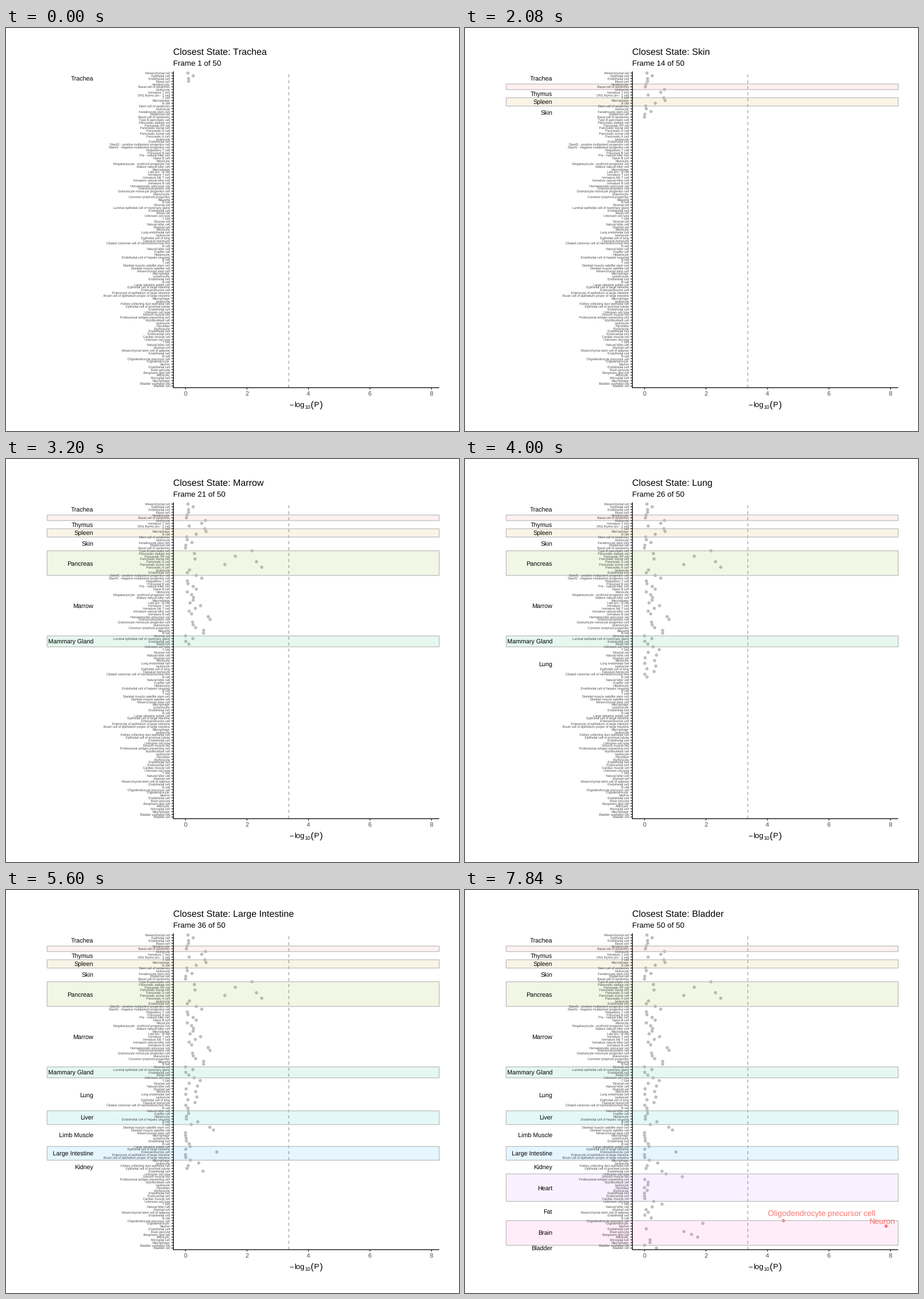
Recreate the animation shown at these times as a matplotlib script. Size 794x706 px, loop 8 s.

```python
import matplotlib.pyplot as plt
from matplotlib.animation import FuncAnimation
from matplotlib.patches import Rectangle

plt.rcParams["font.family"] = "Liberation Sans"
plt.rcParams["text.hinting"] = "none"
plt.rcParams["text.kerning_factor"] = 6

W, H, DPI = 794, 706, 100
PX = 72 / DPI                 # one pixel in points
PT = 88.22 / 72 * PX          # one chart point in figure points
LINE = 1.307 * PX
LEFT, RIGHT, TOP, BOTTOM = 293.4, 759.3, 76.05, 630.1
X0, X_STEP = 314.6, 53.88
Y0, Y_STEP = 78.95, 4.81
CUTOFF = 3.36
STEPS_PER_STATE = 3

GREY, RED = "#BEBEBE", "#F8766D"
BAND_COLORS = ["#F8766D", "#CD9600", "#7CAE00", "#00BE67",
               "#00BFC4", "#00A9FF", "#C77CFF", "#FF61CC"]

TISSUES = {
    "Trachea": [
        ("Mesenchymal cell", .08), ("Epithelial cell", .25),
        ("Endothelial cell", .10), ("Blood cell", .10)],
    "Tongue": [("Keratinocyte", .05), ("Basal cell of epidermis", .03)],
    "Thymus": [
        ("Leukocyte", .65), ("Immature T cell", .53),
        ("DN1 thymic pro - T cell", .12)],
    "Spleen": [("T cell", .63), ("Macrophage", .67), ("B cell", .35)],
    "Skin": [
        ("Stem cell of epidermis", .04), ("Leukocyte", .06),
        ("Keratinocyte stem cell", .21), ("Epidermal cell", .01),
        ("Basal cell of epidermis", 0)],
    "Pancreas": [
        ("Type B pancreatic cell", 2.16), ("Pancreatic stellate cell", .29),
        ("Pancreatic PP cell", 1.62), ("Pancreatic ductal cell", .31),
        ("Pancreatic D cell", 2.31), ("Pancreatic acinar cell", 1.28),
        ("Pancreatic A cell", 2.48), ("Leukocyte", .13),
        ("Endothelial cell", .06)],
    "Marrow": [
        ("Slamf1 - positive multipotent progenitor cell", .35),
        ("Slamf1 - negative multipotent progenitor cell", .53),
        ("Regulatory T cell", .06), ("Precursor B cell", .08),
        ("Pre - natural killer cell", .25), ("Naive B cell", .35),
        ("Monocyte", .06),
        ("Megakaryocyte - erythroid progenitor cell", .20),
        ("Mature natural killer cell", .26), ("Macrophage", .25),
        ("Late pro - B cell", .15), ("Immature T cell", .49),
        ("Immature NK T cell", .32), ("Immature natural killer cell", .12),
        ("Immature B cell", .20), ("Hematopoietic precursor cell", .74),
        ("Granulocytopoietic cell", .80),
        ("Granulocyte monocyte progenitor cell", .23),
        ("Granulocyte", .25), ("Common lymphoid progenitor", .33),
        ("Basophil", .59), ("B cell", .59)],
    "Mammary Gland": [
        ("Stromal cell", 0),
        ("Luminal epithelial cell of mammary gland", .24),
        ("Endothelial cell", .01), ("Basal cell", .11)],
    "Lung": [
        ("Unknown cell type", .28), ("T cell", .48), ("Stromal cell", .12),
        ("Natural killer cell", .39), ("Myeloid cell", .02),
        ("Monocyte", .33), ("Lung endothelial cell", .01),
        ("Leukocyte", .37), ("Epithelial cell of lung", .08),
        ("Classical monocyte", .31),
        ("Ciliated columnar cell of tracheobronchial tree", .01),
        ("B cell", .08)],
    "Liver": [
        ("Natural killer cell", .09), ("Kupffer cell", .10),
        ("Hepatocyte", .03), ("Endothelial cell of hepatic sinusoid", .03),
        ("B cell", .40)],
    "Limb Muscle": [
        ("T cell", .19), ("Skeletal muscle satellite stem cell", .79),
        ("Skeletal muscle satellite cell", .91),
        ("Mesenchymal stem cell", 0), ("Macrophage", 0),
        ("Lymphocyte", .02), ("Endothelial cell", .03), ("B cell", .12)],
    "Large Intestine": [
        ("Large intestine goblet cell", .15),
        ("Epithelial cell of large intestine", .01),
        ("Enteroendocrine cell", 1.02),
        ("Enterocyte of epithelium of large intestine", 0),
        ("Brush cell of epithelium proper of large intestine", .01)],
    "Kidney": [
        ("Macrophage", .16), ("Leukocyte", .43),
        ("Kidney collecting duct epithelial cell", .09),
        ("Epithelial cell of proximal tubule", .05),
        ("Endothelial cell", .57)],
    "Heart": [
        ("Unknown cell type", .70), ("Smooth muscle cell", 1.23),
        ("Professional antigen presenting cell", .01),
        ("Myofibroblast cell", .12), ("Leukocyte", .11),
        ("Fibroblast", 0), ("Erythrocyte", .09), ("Endothelial cell", 0),
        ("Endocardial cell", 0), ("Cardiac muscle cell", .01)],
    "Fat": [
        ("Unknown cell type", .30), ("T cell", .57),
        ("Natural killer cell", .25), ("Myeloid cell", .05),
        ("Mesenchymal stem cell of adipose", .12),
        ("Endothelial cell", .01), ("B cell", .22)],
    "Brain": [
        ("Oligodendrocyte precursor cell", 4.52), ("Oligodendrocyte", 1.90),
        ("Neuron", 7.86), ("Endothelial cell", .06),
        ("Brain pericyte", 1.28), ("Bergmann glial cell", 1.53),
        ("Astrocyte", 1.73), ("Microglial cell", .18),
        ("Macrophage", .18)],
    "Bladder": [("Bladder urothelial cell", 0), ("Bladder cell", .39)],
}
NAMES = list(TISSUES)
UNLABELLED = {"Tongue"}

fig = plt.figure(figsize=(W / DPI, H / DPI), dpi=DPI, facecolor="white")
ax = fig.add_axes([0, 0, 1, 1])
ax.set(xlim=(0, W), ylim=(H, 0))
ax.axis("off")


def sx(value):
    return X0 + X_STEP * value


def sy(row):
    return Y0 + Y_STEP * row


def text(x, y, s, size, color="black", ha="left", z=4):
    return ax.text(x, y, s, fontsize=size * PT, color=color, ha=ha,
                   va="baseline", zorder=z)


def line(xs, ys, color="black", **kw):
    ax.plot(xs, ys, color=color, lw=LINE, solid_capstyle="butt",
            snap=False, **kw)


def draw_axes():
    """Axes lie above the bands, the cutoff line below everything."""
    line([sx(CUTOFF)] * 2, [BOTTOM, TOP], "#A0A0A0", zorder=1,
         linestyle=(0, (4, 4)), dash_capstyle="butt")
    line([LEFT, LEFT], [TOP, BOTTOM], zorder=5.2)
    line([LEFT - .6, RIGHT], [BOTTOM, BOTTOM], zorder=5.2)
    for v in range(0, 9, 2):
        line([sx(v)] * 2, [BOTTOM, BOTTOM + 3.4], "#333333", zorder=5)
        text(sx(v), 644.2, str(v), 8.8, "#4D4D4D", "center")
    rows = [name for cells in TISSUES.values() for name, _ in cells]
    for r, name in enumerate(rows):
        line([LEFT - 3.4, LEFT], [sy(r)] * 2, "#333333", zorder=5)
        text(287.3, sy(r) + 2.1, name, 4.5, "#4D4D4D", "right", z=5)
    for x, y, s, size in [(496, 664.5, "\u2212", 11), (504.8, 664.5, "log", 11),
                          (523.2, 667.3, "10", 7.7), (534.2, 664.8, "(", 13.2),
                          (540.2, 664.5, "P", 11), (550, 664.8, ")", 13.2)]:
        text(x, y, s, size)


def draw_tissue(index, name, row):
    """Return all artists that appear together with one tissue."""
    cells = TISSUES[name]
    top, height = sy(row), Y_STEP * len(cells)
    values = [v for _, v in cells]
    parts = [
        ax.scatter([sx(v) for v in values],
                   [sy(row + i) for i in range(len(cells))],
                   s=(2 * 2.83 * PX) ** 2, linewidths=0, zorder=2,
                   c=[RED if v > CUTOFF else GREY for v in values])]
    if name not in UNLABELLED:
        parts.append(text(153, top + height / 2 + 4.3, name, 8.75, ha="right"))
    if index % 2:
        box = (sx(-4.5), top), RIGHT - sx(-4.5), height
        parts += [
            ax.add_patch(Rectangle(*box, fc=BAND_COLORS[index // 2], alpha=.1,
                                   lw=0, snap=False, zorder=3)),
            ax.add_patch(Rectangle(*box, fill=False, ec=GREY, lw=LINE,
                                   snap=False, zorder=3)),
        ]
    if name == "Brain":
        parts += [
            text(625.5, 571.5, cells[0][0], 11.3, RED, "center"),
            text(732, 584.5, cells[2][0], 11.3, RED, "center"),
        ]
    return parts


draw_axes()
groups, row = [], 0
for k, tissue in enumerate(NAMES):
    groups.append(draw_tissue(k, tissue, row))
    row += len(TISSUES[tissue])

title = text(LEFT, 46.8, "", 13.2)
subtitle = text(LEFT, 66.3, "", 11)
FRAMES = 50


def update(i):
    state, phase = divmod(i, STEPS_PER_STATE)
    # the next tissue already shows during the last step of a state
    last = state + (phase == STEPS_PER_STATE - 1)
    for k, parts in enumerate(groups):
        for part in parts:
            part.set_visible(k <= last)
    title.set_text(f"Closest State: {NAMES[state]}")
    subtitle.set_text(f"Frame {i + 1} of {FRAMES}")
    return []


anim = FuncAnimation(fig, update, frames=FRAMES, interval=160,
                     init_func=lambda: update(0), repeat=True, repeat_delay=0)
plt.show()
```
